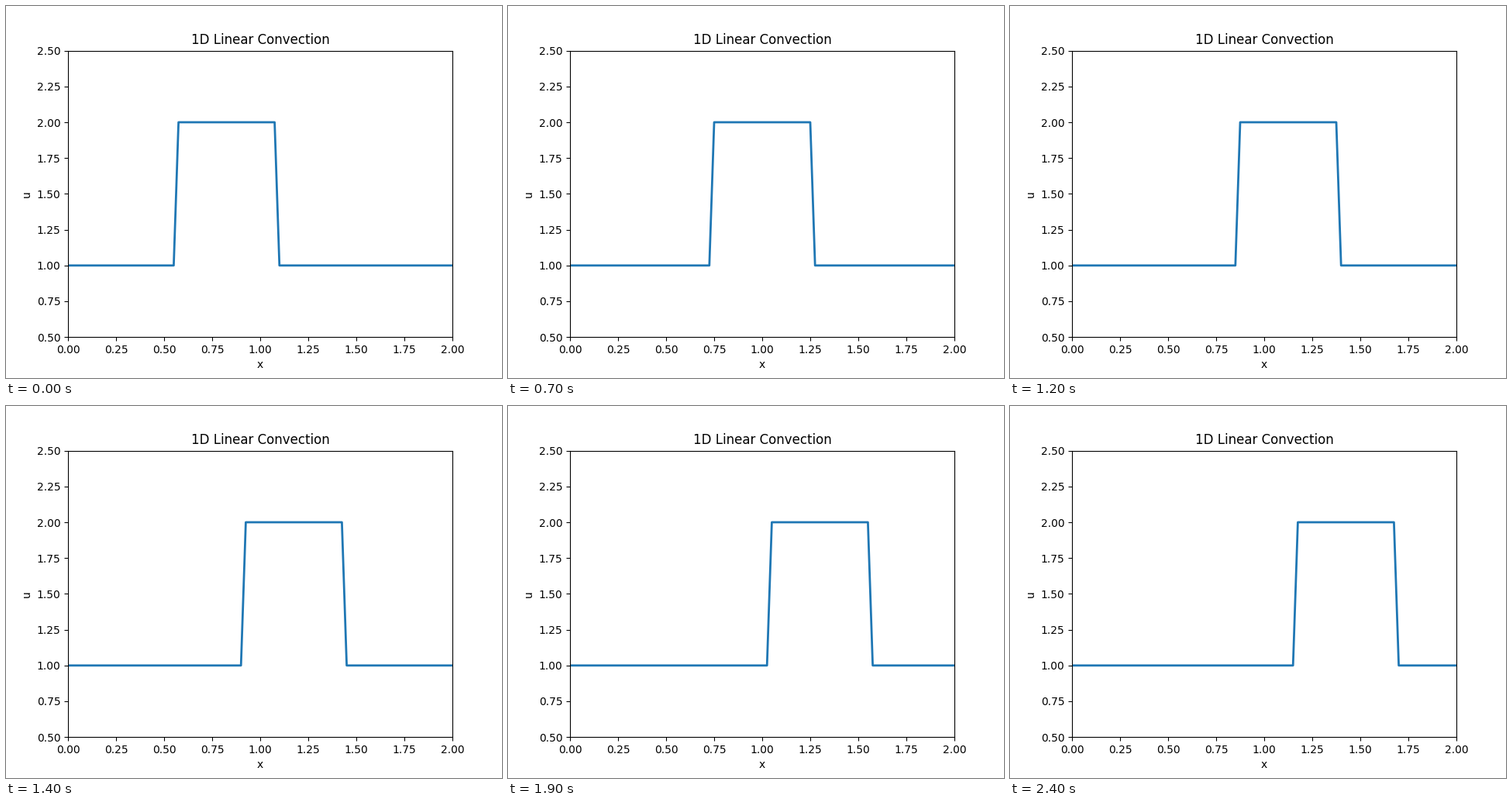
A matplotlib script that plays this animation: 640x480 px, repeating every 2500 ms.

```python
import numpy as np
import matplotlib.pyplot as plt
from matplotlib.animation import FuncAnimation

NX = 81            # grid points, spacing 0.025
FRAMES = 25
START, WIDTH = 23, 21   # first raised cell and number of raised cells

plt.rcParams["font.family"] = "DejaVu Sans"

x = np.linspace(0, 2, NX)
cells = np.arange(NX)


def wave(step):
    """Square pulse carried one cell to the right per step (CFL = 1)."""
    left = START + step
    return np.where((cells >= left) & (cells < left + WIDTH), 2.0, 1.0)


fig, ax = plt.subplots(figsize=(6.4, 4.8), dpi=100)
ax.set(xlim=(0, 2), ylim=(0.5, 2.5), xlabel="x", ylabel="u",
       title="1D Linear Convection")
line, = ax.plot(x, wave(0), lw=2)


def update(step):
    line.set_ydata(wave(step))
    return line,


anim = FuncAnimation(fig, update, frames=FRAMES, interval=100,
                     repeat=True, repeat_delay=0)
plt.show()
```
